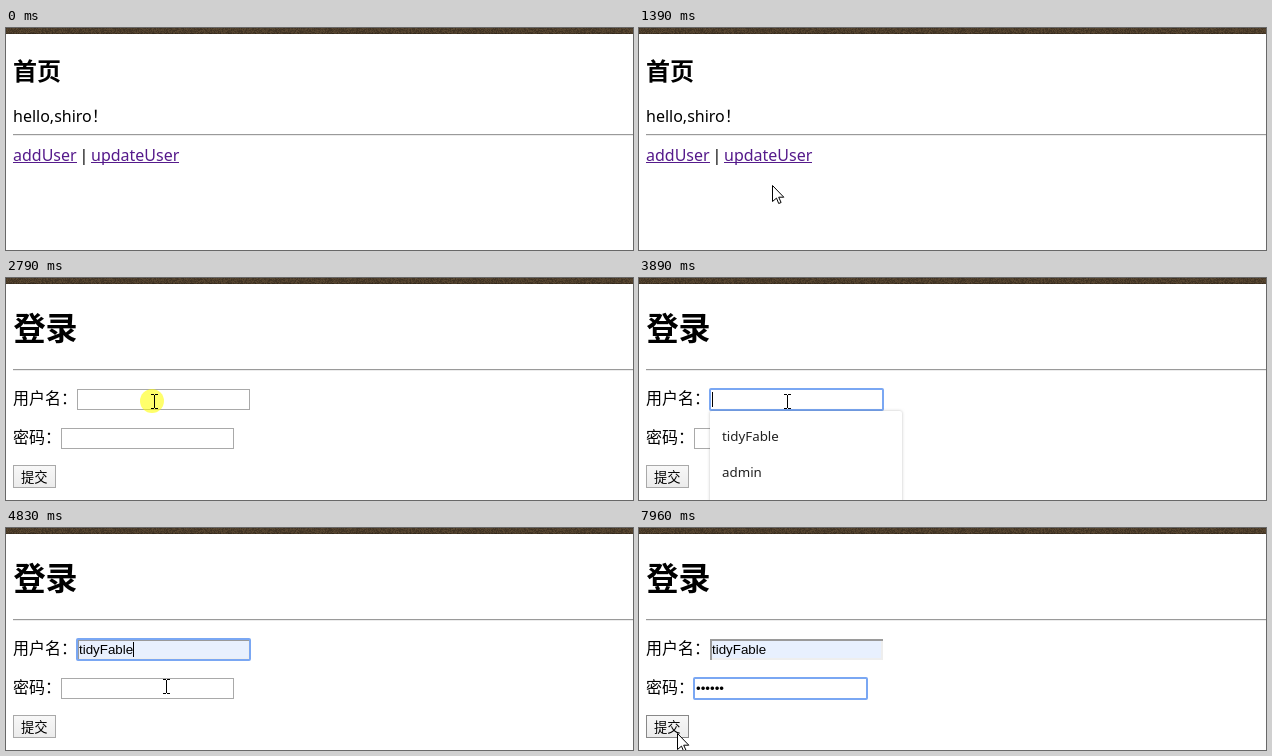
An HTML page with a canvas that plays this animation: 627x222 px, repeating every 8000 ms.

```html
<!DOCTYPE html>
<html lang="zh">
<head>
<meta charset="utf-8">
<title>Login demo</title>
<style>
html, body { margin: 0; width: 100%; height: 100%; overflow: hidden; background: #fff; }
canvas { display: block; }
</style>
</head>
<body>
<canvas id="stage" width="627" height="222"></canvas>
<script>
const ctx = document.getElementById('stage').getContext('2d');
const LOOP = 8000, FRAME = 78.1, FIRST = 70, BLINK = 540;
const LATIN = '"Noto Sans", sans-serif';
const CJK = '"Noto Sans CJK SC", "Noto Sans CJK", sans-serif';
const FIELD = '13.333px "Liberation Sans", sans-serif';
const USER = 'tidyFable';

// Story beats in ms
const LINK = 930, LOGIN = 2090, NAME = 2790, PICK = 4680, SECRET = 5150;
const OPEN = NAME + 2 * FRAME, FILLED = PICK + 150;
const keystrokes = Array.from({ length: 6 }, (_, i) => 6080 + 220 * i);
const clicks = [LINK, NAME, PICK, SECRET];
const moves = [
  { from: FIRST, to: 760, x: 134, y: 125 },
  { from: 1010, to: 1160, x: 129, y: 166 },
  { from: 1235, to: 1390, x: 133, y: 157 },
  { from: 2412, to: 2720, x: 146, y: 123 },
  { from: 4280, to: 4530, x: 158, y: 158 },
  { from: FILLED, to: 4980, x: 149, y: 158 },
  { from: 7640, to: 7955, x: 38, y: 205 }
];

const during = (t, from, to) => t >= from && t < to;
const inside = (p, x, y, w, h) => during(p.x, x, x + w) && during(p.y, y, y + h);

function rect(x, y, w, h, color) {
  ctx.fillStyle = color;
  ctx.fillRect(x, y, w, h);
}

function frame(x, y, w, h, color) {
  ctx.strokeStyle = color;
  ctx.lineWidth = 1;
  ctx.strokeRect(x + .5, y + .5, w - 1, h - 1);
}

function rounded(x, y, w, h, radius) {
  ctx.beginPath();
  ctx.roundRect(x, y, w, h, radius);
}

function text(string, x, y, font, color = '#000') {
  ctx.font = font;
  ctx.fillStyle = color;
  ctx.fillText(string, x, y);
  return x + ctx.measureText(string).width;
}

function rule(y) {
  rect(7, y, 620, 1, '#9a9a9a');
  rect(7, y + 1, 620, 1, '#ececec');
}

function link(label, x, color) {
  const end = text(label, x, 133, '16px ' + LATIN, color);
  rect(x, 134, Math.round(end - x), 1, color);
}

function banner() {
  let seed = 7;
  for (let i = 0; i < 627 * 6; i++) {
    seed = seed * 16807 % 2147483647;
    const y = Math.floor(i / 627);
    const light = (y === 5 ? 15 : 19) + seed % 9;
    rect(i % 627, y, 1, 1, `hsl(33 29% ${light}%)`);
  }
}

function pointerAt(t) {
  const now = FIRST + FRAME * Math.floor((t - FIRST + 15) / FRAME);
  let x = 470, y = 213;
  for (const move of moves) {
    const u = Math.min(1, Math.max(0, (now - move.from) / (move.to - move.from)));
    const eased = u * u * (3 - 2 * u);
    x += (move.x - x) * eased;
    y += (move.y - y) * eased;
  }
  return { x: Math.round(x), y: Math.round(y) };
}

function home(t) {
  text('首页', 7, 52, 'bold 24px ' + CJK);
  const end = text('hello,shiro', 7, 94, '16px ' + LATIN);
  text('！', end, 94, '16px ' + CJK);
  rule(106);
  link('addUser', 7, '#551a8b');
  text('|', 73.5, 133, '16px ' + LATIN);
  link('updateUser', 85, during(t, LINK, LINK + 150) ? '#f00' : '#551a8b');
}

function field(x, y, focused, filled) {
  rect(x, y, 173, 21, filled ? '#e8f0fe' : '#fff');
  if (filled) {
    rect(x, y, 173, 2, '#9a9a9a');
    rect(x, y, 2, 21, '#9a9a9a');
    rect(x + 2, y + 19, 171, 2, '#eee');
    rect(x + 171, y + 2, 2, 19, '#eee');
  } else {
    frame(x, y, 173, 21, '#a9a9a9');
  }
  if (focused) {
    ctx.strokeStyle = '#7aa7f3';
    ctx.lineWidth = 2;
    rounded(x, y, 173, 21, 1);
    ctx.stroke();
  }
}

// The blink restarts at every click and keystroke.
function caret(t, x, y) {
  const restart = Math.max(...[...clicks, ...keystrokes].filter(k => k <= t));
  if ((t - restart) % (2 * BLINK) < BLINK) rect(Math.round(x), y, 1, 15, '#000');
}

function suggestions(hovered) {
  ctx.save();
  ctx.shadowColor = 'rgba(0,0,0,.25)';
  ctx.shadowBlur = 3;
  ctx.fillStyle = '#fff';
  rounded(71, 133, 192, 100, 2);
  ctx.fill();
  ctx.restore();
  if (hovered) rect(71, 141, 192, 36, '#eee');
  [USER, 'admin'].forEach((name, i) => text(name, 83, 163 + 36 * i, '13.333px ' + LATIN, '#222'));
}

function button(hovered) {
  const face = ctx.createLinearGradient(0, 187, 0, 210);
  face.addColorStop(0, '#f8f8f8');
  face.addColorStop(1, '#ebebeb');
  rect(7, 187, 43, 23, face);
  frame(7, 187, 43, 23, hovered ? '#888' : '#a9a9a9');
  text('提交', 15, 204, '13.333px ' + CJK);
}

function login(t, p) {
  const open = during(t, OPEN, FILLED);
  const hovered = open && inside(p, 71, 141, 192, 36);
  const filled = t >= FILLED;
  const nameFocused = during(t, NAME + FRAME, SECRET);

  text('登录', 7.5, 62, 'bold 32px ' + CJK);
  rule(91);
  text('用户名：', 7, 126, '16px ' + CJK);
  text('密码：', 7, 165, '16px ' + CJK);

  field(71, 111, nameFocused, filled);
  if (hovered) rect(72, 112, 171, 19, '#e8f0fe');
  const nameEnd = text(filled || hovered ? USER : '', 73, 126, FIELD);
  if (nameFocused) caret(t, filled ? nameEnd : 73, 114);

  field(55, 150, t >= SECRET, false);
  const typed = keystrokes.filter(k => t >= k).length;
  const secretEnd = text('•'.repeat(typed), 57, 165, FIELD);
  if (t >= SECRET) caret(t, secretEnd, 153);

  button(inside(p, 7, 187, 43, 23));
  if (open) suggestions(hovered);
}

function outline(path, x, y) {
  ctx.save();
  ctx.translate(x + .5, y + .5);
  ctx.lineWidth = 1;
  ctx.strokeStyle = '#000';
  ctx.fillStyle = '#fff';
  ctx.fill(path);
  ctx.stroke(path);
  ctx.restore();
}

const arrow = new Path2D('M0 0V16L4 12.6L6.2 18L8.6 17L6.2 11.7H11.3Z');
const hand = new Path2D('M-2 13V1Q0-2 2 1V6L11 9V15L9 21H-1L-6 12Q-5 9-2 13Z');

function beam(x, y) {
  rect(x + 2, y - 6, 1, 13, '#000');
  for (const row of [y - 7, y + 7]) {
    rect(x - 1, row, 3, 1, '#000');
    rect(x + 3, row, 3, 1, '#000');
  }
}

function pointer(t, p) {
  if (clicks.some(k => during(t, k, k + 150))) {
    ctx.fillStyle = 'rgba(255,255,0,.58)';
    ctx.beginPath();
    ctx.arc(p.x, p.y, 12, 0, 2 * Math.PI);
    ctx.fill();
  }
  const onLink = t < LOGIN && inside(p, 85, 117, 88, 21);
  const onName = inside(p, 71, 111, 173, 21);
  const onSecret = inside(p, 55, 150, 173, 21) && !during(t, OPEN, FILLED);
  if (t >= LOGIN && (onName || onSecret)) beam(p.x, p.y);
  else outline(onLink ? hand : arrow, p.x, p.y);
}

function draw() {
  const t = performance.now() % LOOP;
  const p = pointerAt(t);
  rect(0, 0, 627, 222, '#fff');
  banner();
  if (t < LOGIN) home(t);
  else login(t, p);
  if (t >= FIRST) pointer(t, p);
  requestAnimationFrame(draw);
}
draw();
</script>
</body>
</html>
```
